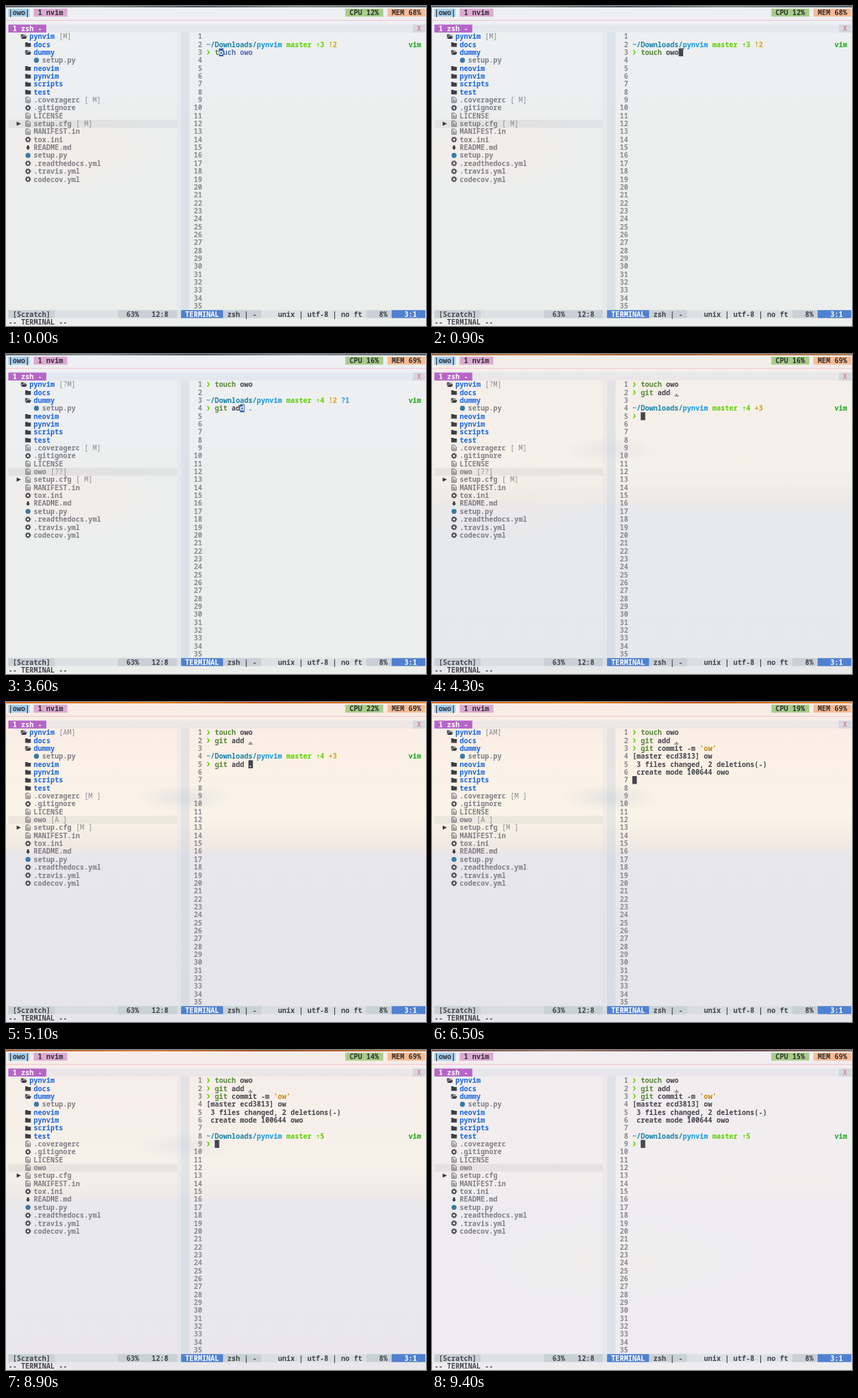
An HTML page that plays this animation: 600x458 px, repeating every 9.5 s.

```html
<!DOCTYPE html>
<html lang="en">
<head>
<meta charset="utf-8">
<title>Terminal session</title>
<style>
html, body { margin: 0; width: 600px; height: 458px; overflow: hidden; background: #edeeee; }
.wall, svg { position: absolute; left: 0; top: 0; width: 600px; height: 458px; }
.wall::before { content: ""; position: absolute; left: 0; top: 0; width: 100%; height: 2px; background: var(--strip); }
#meadow {
  --strip: linear-gradient(90deg, #59616b, #8b9490 20%, #4d5660 45%, #88938f 70%, #555e68);
  background: radial-gradient(130px 60px at 90px 205px, #f3ece8, transparent),
    linear-gradient(#eef0f3, #eceeee 40%, #ebeeeb);
}
#sunset {
  --strip: linear-gradient(90deg, #d9691c, #f08a24 35%, #c9560f 60%, #ee8f2e);
  background: radial-gradient(70px 20px at 255px 137px, #e6e3e2, transparent),
    linear-gradient(#f8ece6, #fbf1e6 18%, #faf3e8 36%, #f1e9e3 45%, #e7e6ea 48%, #e6e5e9);
}
#dusk {
  --strip: linear-gradient(90deg, #6e4a4a, #a4776b 30%, #5d4348 65%, #8b655f);
  background: radial-gradient(230px 70px at 260px 300px, #efeeec, transparent),
    linear-gradient(#f2edf0, #f1eeee 42%, #eeecf0 50%, #eeecef);
}
text { font: 600 10.03px "Noto Sans Mono", "DejaVu Sans Mono", monospace; white-space: pre; }
</style>
</head>
<body>
<div class="wall" id="meadow"></div>
<div class="wall" id="sunset"></div>
<div class="wall" id="dusk"></div>
<svg id="screen" viewBox="0 0 600 458"></svg>
<script>
const LOOP = 9500, CELL = 6.017, LINE = 11.353;
const INK = '#46464e', GRAY = '#808086', LIME = '#5fd000', BLUE = '#5080d0';
const $ = id => document.getElementById(id);
const X = col => 3.4 + col * CELL;
const Y = row => 43.6 + (row - 1) * LINE;          // middle of a row
const clamp = v => Math.max(0, Math.min(1, v));
const since = (t, list) => list.filter(e => e[0] <= t).pop();

const text = (col, row, s, fill = INK, weight = 600) =>
  `<text x="${X(col)}" y="${Y(row) + 3.6}" fill="${fill}" style="font-weight:${weight}">${s}</text>`;
const box = (from, to, row, fill, rows = 1) =>
  `<rect x="${X(from)}" y="${Y(row) - LINE / 2}" width="${(to - from) * CELL}" height="${LINE * rows}" fill="${fill}"/>`;
const span = (s, style) => `<tspan style="${style}">${s}</tspan>`;

const ICONS = {
  folder: '<path d="M0-3H3L4-2H8V3.5H0Z"/>',
  open: '<path d="M0-3H3L4-2H7V-1H2L0 3ZM2.2-.3H8.6L7 3.5H.5Z"/>',
  file: '<path d="M.8-3.8H4.8L7.2-1.5V3.8H.8ZM2.2-1.2H4M2.2.5H5.8M2.2 2.1H5.8" fill="none" stroke="#55555c" stroke-width=".9"/>',
  gear: '<circle cx="4" r="2.5" fill="none" stroke="#46464e" stroke-width="1.7"/><circle cx="4" r="3.6" fill="none" stroke="#46464e" stroke-width="1.2" stroke-dasharray="1.4 1.43"/>',
  disc: '<circle cx="4" r="3.6" fill="#3c79a4"/>',
  arrow: '<path d="M2.5-3.5L4-2.5 5.5-3.5V0H7L4 3.7 1 0H2.5Z"/>'
};

// Each entry: indent column, icon, name, git marks by phase
const TREE = [
  [3, 'open', 'pynvim', ['[M]', '[?M]', '[AM]']],
  [4, 'folder', 'docs'], [4, 'open', 'dummy'], [6, 'disc', 'setup.py'],
  [4, 'folder', 'neovim'], [4, 'folder', 'pynvim'], [4, 'folder', 'scripts'], [4, 'folder', 'test'],
  [4, 'file', '.coveragerc', ['[ M]', '[ M]', '[M ]']],
  [4, 'gear', '.gitignore'], [4, 'file', 'LICENSE'],
  [4, 'file', 'owo', ['', '[??]', '[A ]']],
  [4, 'file', 'setup.cfg', ['[ M]', '[ M]', '[M ]']],
  [4, 'file', 'MANIFEST.in'], [4, 'gear', 'tox.ini'], [4, 'arrow', 'README.md'], [4, 'disc', 'setup.py'],
  [4, 'gear', '.readthedocs.yml'], [4, 'gear', '.travis.yml'], [4, 'gear', 'codecov.yml']
];

function tree(phase) {
  let out = box(0, 40, 12, 'rgba(60,60,80,.065)');
  TREE.filter(e => phase || e[2] !== 'owo').forEach(([col, icon, name, marks = []], i) => {
    const row = i + 1, dir = icon === 'folder' || icon === 'open';
    out += `<g transform="translate(${X(col)} ${Y(row)})" fill="#3d3d45">${ICONS[icon]}</g>`;
    out += text(col + 2, row, name, dir ? '#1b66de' : GRAY, dir ? 700 : 600);
    if (marks[phase]) out += text(col + 3 + name.length, row, marks[phase], '#8e8e93', 500);
    if (name === 'setup.cfg') out += `<path d="M15.3 ${Y(row) - 3}l6 3-6 3z" fill="#38383f"/>`;
  });
  return out;
}

function chevron(row) {
  return `<path d="M287 ${Y(row) - 3.3}h1.7l2.4 3.3-2.4 3.3h-1.7l2.2-3.3z" fill="${LIME}"/>`;
}

function command(row, typed, hint = '') {
  const rich = typed
    .replace(/'.*/, q => span(q, 'fill:#c08a18'))
    .replace(/^\w+/, w => span(w, 'fill:#568738'))
    .replace(/\.$/, span('.', 'text-decoration:underline'));
  return chevron(row) + text(49, row, rich + (hint && span(hint, 'fill:#4c6bb0')));
}

function cursor(col, row, char = '', fill = '#45454c') {
  return box(col, col + 1.06, row, fill) + text(col, row, char, '#fff');
}

function entry(row, typed, hint = '') {
  const at = 49 + typed.length;
  return command(row, typed, hint) + cursor(at, row, hint[0], hint ? '#315fab' : undefined);
}

function prompt(row, ...marks) {
  const colors = { '!': '#d5a514', '+': '#c9a018', '?': '#22a0dc' };
  let col = 67, out = text(47, row, '~/Downloads/' + span('pynvim', 'fill:#1399df;font-weight:700'), '#1683ac');
  for (const m of ['master', ...marks]) {
    out += text(col - 1, row, m, colors[m[0]] || LIME);
    col += m.length + 1;
  }
  return out + text(95, row, 'vim', '#17ad17', 700);
}

function shell(t) {
  const first = 'touch owo', second = 'git add .', third = "git commit -m 'ow'";
  const typing = (s, start, step) => s.slice(0, Math.max(0, Math.floor((t - start) / step)));
  if (t < 1100) {
    const typed = typing(first, -100, 100);
    return prompt(2, '⇡3', '!2') + entry(3, typed, first.slice(typed.length));
  }
  let out = command(1, first);
  if (t < 1300) return out + cursor(47, 2);
  if (t < 4100) {
    const typed = typing(second, 3000, 100);
    return out + prompt(3, '⇡4', '!2', '?1') + entry(4, typed, typed && second.slice(typed.length));
  }
  out += command(2, second);
  if (t < 4300) return out + cursor(47, 3);
  if (t < 6500) {
    out += prompt(4, '⇡4', '+3');
    if (t < 5000) return out + entry(5, '');
    if (t < 5200) return out + command(5, second) + cursor(57, 5, '.');
    return out + entry(5, 'git ' + typing(third.slice(4), 5200, 71));
  }
  out += command(3, third) + text(47, 4, '[master ecd3813] ow') +
    text(48, 5, '3 files changed, 2 deletions(-)') + text(48, 6, 'create mode 100644 owo');
  return out + (t < 6900 ? cursor(47, 7) : prompt(8, '⇡5') + entry(9, ''));
}

function frame() {
  const bar = 'rgba(190,204,214,.36)', chip = '#c9d1d7';
  let out = box(0, 5, -2, '#a5cdec') + text(0, -2, '|owo|', '#333a44') +
    box(6, 14, -2, '#dcaad0') + text(7, -2, '1 nvim', '#33303a') +
    box(80, 89, -2, '#a9cc8c') + box(90, 99, -2, '#f5bd98') +
    '<path d="M0 20.5H600" stroke="#f3c3d0"/>' +
    box(0, 99, 0, 'rgba(205,213,224,.28)') +
    box(0, 9, 0, '#b565c6') + text(1, 0, '1 zsh -', '#fff') +
    box(96, 99, 0, '#d5d8de') + text(97, 0, 'X', '#dc5f68', 500) +
    box(40, 41, 1, 'rgba(215,222,230,.3)', 35) + box(41, 43, 1, 'rgba(190,204,218,.36)', 35);
  for (let n = 1; n <= 35; n++) out += text(44, n, String(n).padStart(2), '#8b8b91');
  out += box(0, 99, 36, bar) + box(0, 11, 36, chip) + text(1, 36, '[Scratch]') +
    box(26, 40, 36, chip) + text(28, 36, '63%   12:8') +
    box(41, 51, 36, BLUE) + text(42, 36, 'TERMINAL', '#fff', 700) +
    box(51, 60, 36, chip) + text(52, 36, 'zsh | -') + text(64, 36, 'unix | utf-8 | no ft') +
    box(85, 91, 36, chip) + text(88, 36, '8%') +
    box(91, 99, 36, BLUE) + text(94, 36, '3:1', '#fff') + text(0, 37, '-- TERMINAL --');
  return out;
}
const FRAME = frame();

const LOAD = [[0, 12, 68], [1500, 16, 69], [4500, 22, 69], [6100, 19, 69], [7900, 14, 69], [9000, 15, 69]];
const PHASES = [[0, 0], [2400, 1], [4600, 2], [8700, 3]];

function draw(t) {
  const [, cpu, mem] = since(t, LOAD);
  $('sunset').style.opacity = clamp((t - 3700) / 1000);
  $('dusk').style.opacity = clamp((t - 8600) / 800);
  $('screen').innerHTML = FRAME + text(81, -2, `CPU ${cpu}%`, '#2c3328') + text(91, -2, `MEM ${mem}%`, '#3a2f2a') +
    tree(since(t, PHASES)[1]) + shell(t);
}

const start = performance.now();
let last = -1;
function tick() {
  const t = Math.floor((performance.now() - start) % LOOP / 100) * 100;
  if (t !== last) draw(last = t);
  requestAnimationFrame(tick);
}
tick();
</script>
</body>
</html>
```
